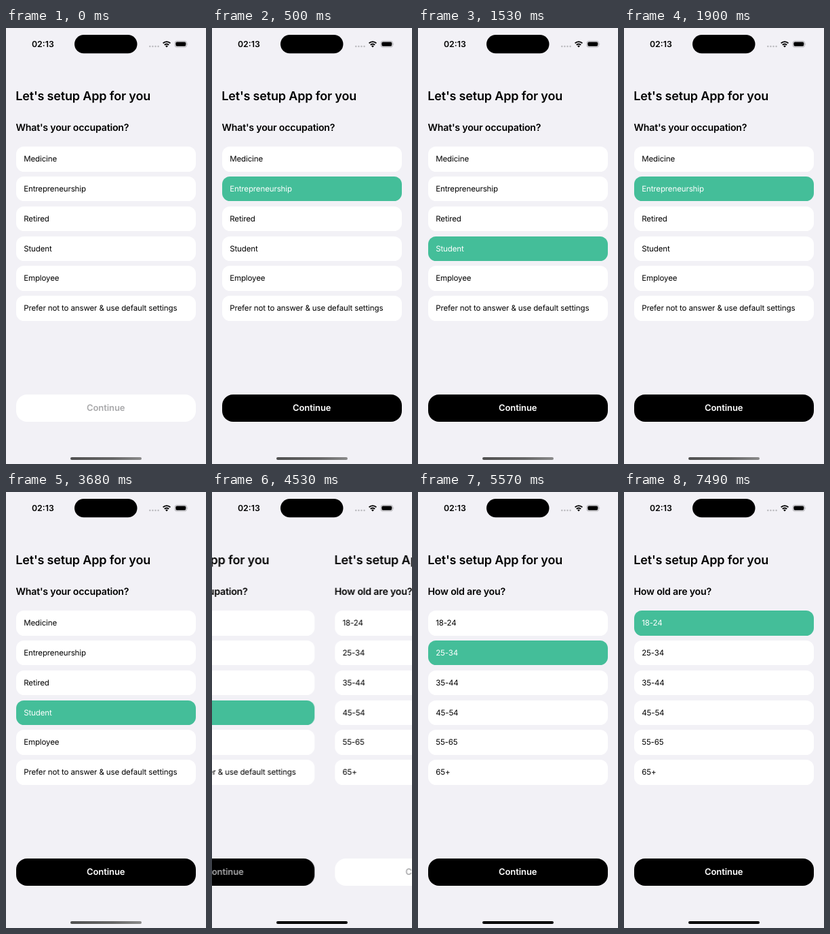
An HTML page that plays this animation: 295 px wide and 640 px high, repeating every 8 s.

```html
<!DOCTYPE html>
<html lang="en">
<head>
<meta charset="utf-8">
<title>App setup</title>
<style>
  :root { --bg: #f2f1f6; --green: #44be99; --mute: #a9a9ab; }
  html, body { margin: 0; width: 100%; height: 100%; overflow: hidden; background: var(--bg); }
  #stage {
    position: relative; width: 295px; height: 640px; overflow: hidden;
    background: var(--bg); color: #000; font-family: Inter, "Liberation Sans", sans-serif;
    text-rendering: geometricPrecision;
  }
  #stage * { position: absolute; box-sizing: border-box; margin: 0; white-space: nowrap; }
  .move { animation: 8s step-end infinite; }

  #track { left: 0; top: 0; width: 590px; height: 640px; animation-name: slide; }
  .page { top: 0; width: 295px; height: 640px; }
  .page + .page { left: 295px; }
  h1 { left: 14.2px; top: 88px; font: 600 18px/26px Inter, "Liberation Sans", sans-serif; letter-spacing: -.009em; }
  h2 { left: 14.5px; top: 136px; font: 600 14.2px/22px Inter, "Liberation Sans", sans-serif; letter-spacing: -.0145em; }
  .row {
    left: 14.6px; top: calc(173.8px + var(--i) * 43.9px); width: 265.2px; height: 36.8px;
    padding-left: 11.6px; border-radius: 11.5px; background: #fff;
    font-size: 11.5px; line-height: 37.8px; letter-spacing: -.01em;
  }
  .next {
    left: 14.6px; top: 537.7px; width: 265.2px; height: 40.7px; border-radius: 16px;
    background: #fff; color: var(--mute); text-align: center;
    font-size: 13px; font-weight: 600; line-height: 41px; letter-spacing: -.005em;
  }

  #clock { left: 38px; top: 15px; font-size: 12.3px; font-weight: 600; line-height: 18px; }
  #status { left: 0; top: 0; }
  #home { left: 94.7px; top: 630.2px; width: 105.2px; height: 3.8px; border-radius: 2px; animation-name: home; }

  @keyframes slide {
    0%      { transform: translateX(0); }
    54%     { transform: translateX(-2px); }
    55.25%  { transform: translateX(-38px); }
    56.625% { transform: translateX(-128.7px); }
    57.875% { transform: translateX(-226px); }
    60.875%, 100% { transform: translateX(-295px); }
  }
  @keyframes founder {
    0%, 13.125%, 46%, 100% { background: #fff; color: #000; }
    6.25%, 23.75% { background: var(--green); color: #fff; }
  }
  @keyframes retired {
    0%, 19.125%, 100% { background: #fff; color: #000; }
    13.125% { background: var(--green); color: #fff; }
  }
  @keyframes student {
    0%, 23.75% { background: #fff; color: #000; }
    19.125%, 46%, 100% { background: var(--green); color: #fff; }
  }
  @keyframes young {
    0% { background: #fff; color: #000; }
    93.625%, 100% { background: var(--green); color: #fff; }
  }
  @keyframes adult {
    0%, 93.625%, 100% { background: #fff; color: #000; }
    69.625% { background: var(--green); color: #fff; }
  }
  @keyframes nextJob {
    0% { background: #fff; color: var(--mute); }
    6.25% { background: #000; color: #fff; }
    54%, 100% { background: #000; color: var(--mute); }
  }
  @keyframes nextAge {
    0% { background: #fff; color: var(--mute); }
    69.625%, 100% { background: #000; color: #fff; }
  }
  @keyframes home {
    0% { background: linear-gradient(90deg, #505050, #666 60%, #8a8a8a); }
    54%, 100% { background: linear-gradient(90deg, #000, #000 60%, #000); }
  }
</style>
</head>
<body>
<div id="stage">
  <div id="track" class="move">
    <section class="page">
      <h1>Let's setup App for you</h1>
      <h2>What's your occupation?</h2>
      <div class="row" style="--i:0">Medicine</div>
      <div class="row move" style="--i:1; animation-name:founder">Entrepreneurship</div>
      <div class="row move" style="--i:2; animation-name:retired">Retired</div>
      <div class="row move" style="--i:3; animation-name:student">Student</div>
      <div class="row" style="--i:4">Employee</div>
      <div class="row" style="--i:5">Prefer not to answer &amp; use default settings</div>
      <div class="next move" style="animation-name:nextJob">Continue</div>
    </section>
    <section class="page">
      <h1>Let's setup App for you</h1>
      <h2>How old are you?</h2>
      <div class="row move" style="--i:0; animation-name:young">18-24</div>
      <div class="row move" style="--i:1; animation-name:adult">25-34</div>
      <div class="row" style="--i:2">35-44</div>
      <div class="row" style="--i:3">45-54</div>
      <div class="row" style="--i:4">55-65</div>
      <div class="row" style="--i:5">65+</div>
      <div class="next move" style="animation-name:nextAge">Continue</div>
    </section>
  </div>

  <div id="clock">02:13</div>
  <svg id="status" width="295" height="50" viewBox="0 0 295 50">
    <rect x="101" y="10" width="92.5" height="27.3" rx="13.65"/>
    <path d="M212.3 27h13" fill="none" stroke="#b9b9bd" stroke-width="2.4" stroke-linecap="round" stroke-dasharray="0 4.1"/>
    <g fill="none" stroke="#000" stroke-width="1.9">
      <path d="M231.6 22.4a7.6 7.6 0 0 1 10.8 0"/>
      <path d="M233.8 24.8a4.5 4.5 0 0 1 6.4 0"/>
    </g>
    <path d="M237 28.4l-1.9-2a2.7 2.7 0 0 1 3.8 0z"/>
    <rect x="249" y="19.3" width="17.6" height="8.8" rx="2.8" fill="none" stroke="#a2a2a6" stroke-width=".8"/>
    <rect x="250.3" y="20.6" width="15" height="6.2" rx="1.7"/>
    <path d="M267.6 22.3q1.3 1.4 0 2.8z" fill="#a2a2a6"/>
  </svg>
  <div id="home" class="move"></div>
</div>
</body>
</html>
```
